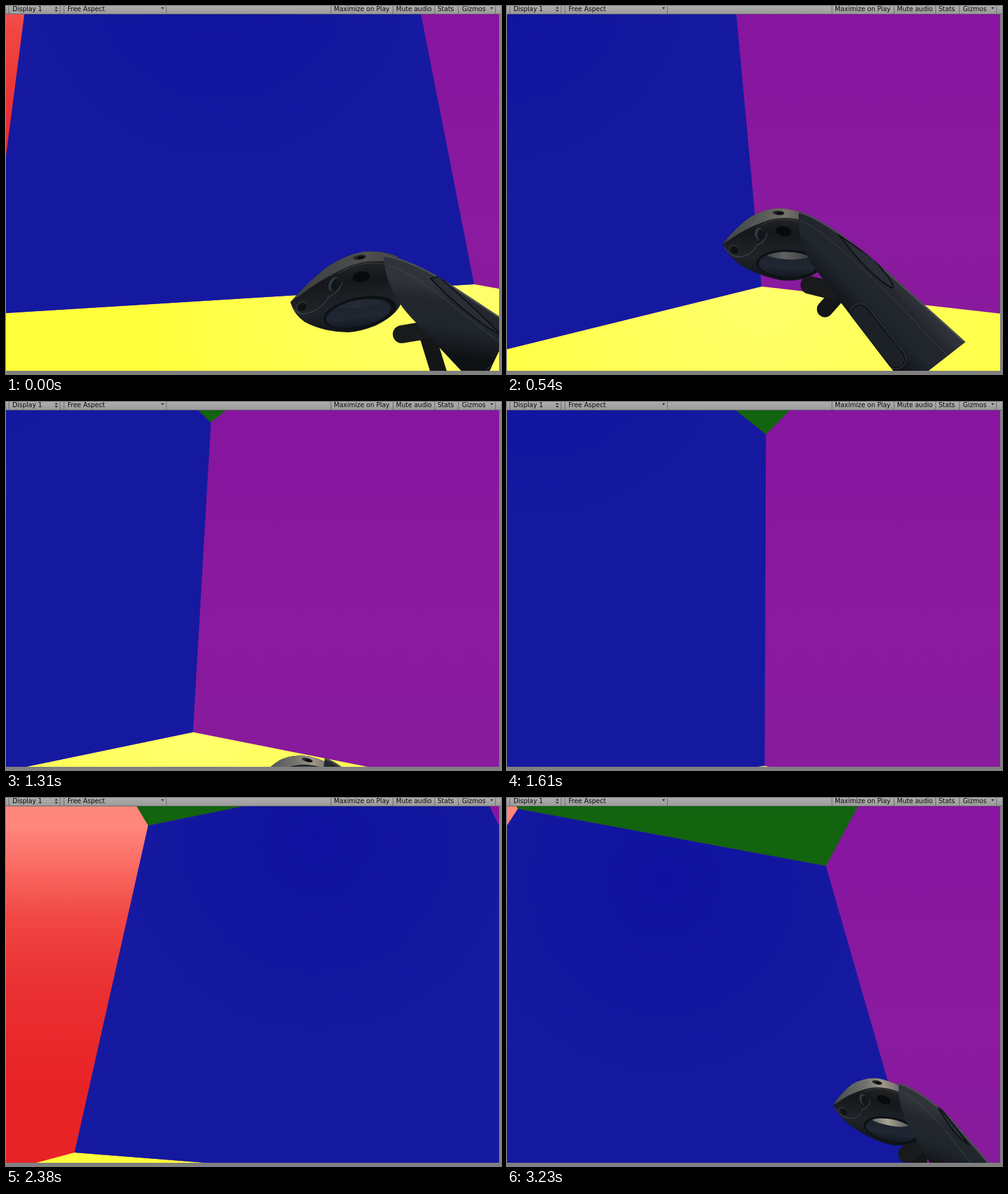
An HTML page with a canvas that plays this animation: 773 px wide and 574 px high, repeating every 3.31 s.

```html
<!DOCTYPE html>
<html lang="en">
<head>
<meta charset="utf-8">
<title>Game view</title>
<style>
  html, body { margin: 0; width: 100%; height: 100%; overflow: hidden; background: #808080; }
  canvas, svg { position: absolute; left: 0; top: 0; display: block; }
  text { font: 10px "DejaVu Sans", sans-serif; fill: #0a0a0a; }
</style>
</head>
<body>
<canvas id="view" width="773" height="574"></canvas>
<svg width="773" height="574" viewBox="0 0 773 574">
  <defs>
    <linearGradient id="bar" x2="0" y2="1">
      <stop stop-color="#adadad"/><stop offset="1" stop-color="#9b9b9b"/>
    </linearGradient>
  </defs>
  <rect width="773" height="12" fill="url(#bar)"/>
  <rect y="12" width="773" height="1" fill="#686868"/>
  <path d="M4.5 0V12M84.5 0V12M90.5 0V12M250.5 0V12M507.5 0V12M604.5 0V12M669.5 0V12M706.5 0V12M764.5 0V12" stroke="#686868"/>
  <path d="M76 4h5l-2.500-3zM76 6h5l-2.500 3zM242 2h5l-2.500 3zM756 2h5l-2.500 3z" fill="#333"/>
  <text x="10" y="8">Display 1</text>
  <text x="96" y="8">Free Aspect</text>
  <text x="512" y="8">Maximize on Play</text>
  <text x="609" y="8">Mute audio</text>
  <text x="674" y="8">Stats</text>
  <text x="712" y="8">Gizmos</text>
</svg>
<script>
const ctx = document.getElementById('view').getContext('2d');
const LOOP = 3310, STEPS = 43, FPS = 13;
const KEYS = [0, 4, 11, 17, 25, 31, 42];

// Corners of the back wall, as x and y tracks over KEYS
const room = {
  rightFloor: [[731, 542, 279, 292, 745, 1052, 652], [434, 428, 464, 515, 640, 627, 640]],
  rightTop: [[620, 452, 274.7, 320, 598, 721, 498], [-130, -90, -25, 32, 68, -58, 106]],
  leftFloor: [[-32, -260, -500, -480, -192, 107, -377], [481, 591, 665, 675, 640, 553, 620]],
  leftTop: [[48.6, -200, -520, -480, 134, 222, 17], [-140, -200, -230, -728, 15, 43, 17]]
};
// Directions of the side wall edges, in degrees
const floorAngle = [10.2, 7.5, 5.8, 11.2, 17, 17, 17];
const topAngle = [-45, -31, -39, -39.6, -59, -63, -61.7];

// Controller points for four poses; it leaves the view after the third
const hand = {
  tip: [445, 463, 386, 373, 297, 372, 510, 480],
  top: [557, 384, 488, 311, 375, 336, 580, 438],
  bot: [535, 509, 480, 426, 385, 436, 595, 540],
  a: [590, 388, 520, 316, 400, 338, 612, 444],
  b: [640, 397, 570, 327, 445, 352, 650, 458],
  c: [700, 438, 690, 430, 520, 460, 690, 496],
  end: [790, 497, 790, 500, 602, 594, 780, 600],
  low: [740, 600, 720, 596, 497, 596, 690, 620],
  d: [630, 483, 552, 402, 412, 420, 632, 520],
  block: [618, 512, 535, 432, 421, 448, 625, 555],
  trigger: [680, 585, 577, 472, 430, 477, 640, 590],
  pad0: [663, 425, 590, 350, 455, 386, 675, 485],
  pad1: [775, 515, 692, 433, 518, 466, 720, 540],
  grip0: [765, 575, 652, 480, 465, 482, 735, 590],
  grip1: [800, 610, 722, 555, 491, 548, 760, 640]
};
const gripWidth = [30, 38, 18, 18, 18, 18, 18];
const shine = [.2, .5, .65, 1, 1, 1, 1];

const away = (v, i, shift) =>
  [v[i], v[i + 2], v[i + 4], ...shift.map(s => v[i + 4] + s), v[i + 6]];
for (const name in hand) {
  const v = hand[name];
  hand[name] = [away(v, 0, [98, 398, 498]), away(v, 1, [217, 327, 387])];
}

// Monotone cubic through the keys
function at(v, k) {
  let i = 0;
  while (i < KEYS.length - 2 && k >= KEYS[i + 1]) i++;
  const slope = j => (v[j + 1] - v[j]) / (KEYS[j + 1] - KEYS[j]);
  const tangent = j => {
    if (j === 0) return slope(0);
    if (j === KEYS.length - 1) return slope(j - 1);
    const p = slope(j - 1), q = slope(j);
    return p * q <= 0 ? 0 : 2 * p * q / (p + q);
  };
  const h = KEYS[i + 1] - KEYS[i], u = (k - KEYS[i]) / h, w = 1 - u;
  return v[i] * w * w * (1 + 2 * u) + v[i + 1] * u * u * (3 - 2 * u)
    + h * u * w * (tangent(i) * w - tangent(i + 1) * u);
}

const pose = (rig, k) => Object.fromEntries(
  Object.entries(rig).map(([name, [x, y]]) => [name, [at(x, k), at(y, k)]]));
const mix = (p, q, u) => [p[0] + (q[0] - p[0]) * u, p[1] + (q[1] - p[1]) * u];
const ray = (p, deg) => [p[0] + 3000 * Math.cos(deg * Math.PI / 180), p[1] + 3000 * Math.sin(deg * Math.PI / 180)];

function stops(g, list) {
  list.forEach(([o, c]) => g.addColorStop(o, c));
  return g;
}
const linear = (p, q, ...list) => stops(ctx.createLinearGradient(...p, ...q), list);
const radial = (p, r, ...list) => stops(ctx.createRadialGradient(...p, 0, ...p, r), list);

function poly(fill, ...pts) {
  ctx.beginPath();
  pts.forEach(p => ctx.lineTo(...p));
  ctx.closePath();
  ctx.fillStyle = fill;
  ctx.fill();
}
function line(color, width, p, q) {
  ctx.beginPath();
  ctx.moveTo(...p);
  ctx.lineTo(...q);
  ctx.strokeStyle = color;
  ctx.lineWidth = width;
  ctx.stroke();
}
function oval(fill, x, y, rx, ry, turn = 0) {
  ctx.beginPath();
  ctx.ellipse(x, y, rx, ry, turn, 0, 7);
  ctx.fillStyle = fill;
  ctx.fill();
}

function drawRoom(k) {
  const { rightFloor: A, rightTop: B, leftFloor: C, leftTop: D } = pose(room, k);
  ctx.fillStyle = linear([0, 13], [0, 569], [0, '#87159f'], [.6, '#8a1a9f'], [1, '#881a9c']);
  ctx.fillRect(0, 0, 773, 574);
  const red = linear([0, D[1]], [0, C[1]],
    [0, '#ff877c'], [.12, '#fb6c64'], [.28, '#f14743'], [.5, '#ea3032'], [.8, '#e82326']);
  poly(red, [C[0], C[1] + 3000], C, D, [D[0], D[1] - 3000], [-5000, -3000], [-5000, 4000]);
  const yellow = radial(A, 520, [0, '#ffff6c'], [.45, '#ffff58'], [1, '#ffff3c']);
  poly(yellow, ray(C, 165), C, A, ray(A, at(floorAngle, k)), [386, 5000]);
  poly('#12640f', ray(D, -121), D, B, ray(B, at(topAngle, k)), [386, -5000]);
  const dark = mix(mix(D, B, .5), mix(C, A, .5), .12);
  poly(radial(dark, 460, [0, '#0f129f'], [.35, '#12169f'], [.75, '#161aa1'], [1, '#15199f']), A, B, D, C);
}

function drawHead(h, gloss) {
  const [x, y] = h.tip, det = 11234;
  const e = [h.top[0] - x, h.top[1] - y], f = [h.bot[0] - x, h.bot[1] - y];
  const m = (i, p, q) => (e[i] * p + f[i] * q) / det;
  ctx.save();
  ctx.transform(m(0, 53, 62), m(1, 53, 62), m(0, -94, 102), m(1, -94, 102), x, y);
  ctx.translate(-386, -373);

  ctx.fillStyle = linear([0, 310], [0, 426], [0, '#292b2d'], [.35, '#15171a'], [.7, '#202429'], [1, '#101215']);
  ctx.fill(new Path2D('M385 372Q404 350 432 329Q460 312 488 310.500Q518 311 544 324L556 393Q550 410 520 421Q498 427 480 426Q440 421 410 403Q392 390 385 372Z'));

  const rim = new Path2D('M386 371Q404 350 432 329Q460 312 488 310.500Q518 311 544 324L528 329Q488 320 456 334Q424 346 398 364Z');
  ctx.fillStyle = '#3b3e40';
  ctx.fill(rim);
  ctx.globalAlpha = gloss;
  ctx.fillStyle = linear([390, 0], [544, 0], [0, '#42484b'], [.45, '#71736e'], [.68, '#a1978a'], [1, '#4d5351']);
  ctx.fill(rim);
  ctx.globalAlpha = 1;

  oval('#25282b', 484, 318, 10, 3.5);
  oval('#0b0c0e', 486, 318.5, 6, 2.5);
  oval('#080a0c', 490, 347, 13, 8, .1);
  oval('#303b45', 449, 353, 8, 10, .2);
  oval('#11161b', 451, 354, 6, 9, .2);
  oval('#282d31', 403, 380, 9, 8);
  oval('#101214', 404, 381, 7, 6);
  ctx.strokeStyle = '#454b50';
  ctx.lineWidth = 1;
  ctx.stroke(new Path2D('M388 377Q399 397 422 389Q437 383 443 371Q458 366 462 352'));
  ctx.setLineDash([2, 2]);
  ctx.stroke(new Path2D('M455 338Q490 320 534 335'));
  ctx.setLineDash([]);

  oval('#0d1014', 494, 399, 55, 23, -.04);
  ctx.save();
  ctx.beginPath();
  ctx.ellipse(492, 400, 49, 20, -.04, 0, 7);
  ctx.clip();
  ctx.fillStyle = linear([0, 380], [0, 420], [0, '#1b222d'], [.6, '#202733'], [1, '#131820']);
  ctx.fillRect(430, 370, 120, 60);
  ctx.globalAlpha = Math.max(0, gloss - .15);
  oval(linear([450, 0], [535, 0], [0, '#62645f'], [.45, '#c3b9a4'], [1, '#55585a']), 493, 381, 42, 11);
  ctx.restore();
  ctx.restore();
}

function drawHandle(h, k) {
  const body = new Path2D(), back = mix(mix(h.d, h.a, .5), h.tip, .12);
  body.moveTo(...h.a);
  body.quadraticCurveTo(...h.b, ...h.c);
  body.lineTo(...h.end);
  body.lineTo(...h.low);
  body.lineTo(...h.d);
  body.quadraticCurveTo(...back, ...h.a);
  ctx.save();
  ctx.fillStyle = linear(h.c, mix(h.d, h.low, .5),
    [0, '#30343a'], [.25, '#23272d'], [.6, '#20262d'], [.85, '#171b20'], [1, '#0f1215']);
  ctx.fill(body);
  ctx.clip(body);

  ctx.beginPath();
  ctx.moveTo(...h.a);
  ctx.quadraticCurveTo(...h.b, ...h.c);
  ctx.lineTo(...h.end);
  ctx.strokeStyle = '#4b4f52';
  ctx.lineWidth = 5;
  ctx.stroke();

  // Seam along the upper side
  ctx.beginPath();
  ctx.moveTo(...mix(h.a, h.d, .18));
  ctx.quadraticCurveTo(...mix(h.b, h.d, .22), ...mix(h.c, h.low, .24));
  ctx.lineTo(...mix(h.end, h.low, .3));
  ctx.strokeStyle = '#46505a';
  ctx.lineWidth = 1;
  ctx.setLineDash([2, 2]);
  ctx.stroke();
  ctx.setLineDash([]);

  const bulge = mix(mix(h.pad0, h.pad1, .5), h.low, .12);
  ctx.beginPath();
  ctx.moveTo(...h.pad0);
  ctx.quadraticCurveTo(...bulge, ...h.pad1);
  ctx.quadraticCurveTo(...mix(h.pad1, h.c, .5), ...mix(h.b, h.c, .6));
  ctx.closePath();
  ctx.fillStyle = '#282d36';
  ctx.fill();
  ctx.strokeStyle = '#0d1013';
  ctx.lineWidth = 2;
  ctx.stroke();

  const w = at(gripWidth, k);
  line('#3a4148', w + 2, h.grip0, h.grip1);
  line('#0c0f12', w, h.grip0, h.grip1);
  line('#1c2127', w - 4, h.grip0, h.grip1);
  ctx.restore();
}

function drawController(k) {
  const h = pose(hand, k);
  ctx.lineCap = 'round';
  line('#141517', 25, mix(h.d, h.low, .25), h.trigger);
  line('#191a1b', 28, h.block, mix(h.d, h.low, .2));
  drawHead(h, at(shine, k));
  drawHandle(h, k);
}

function draw(k) {
  ctx.fillStyle = '#808080';
  ctx.fillRect(0, 0, 773, 574);
  ctx.save();
  ctx.beginPath();
  ctx.rect(0, 13, 770, 556);
  ctx.clip();
  drawRoom(k);
  drawController(k);
  ctx.restore();
}

const stepStart = k => Math.round(k * 100 / FPS) * 10;
let shown = -1;
function tick() {
  const t = performance.now() % LOOP;
  let k = STEPS - 1;
  while (stepStart(k) > t) k--;
  if (k !== shown) draw(shown = k);
  requestAnimationFrame(tick);
}
tick();
</script>
</body>
</html>
```
